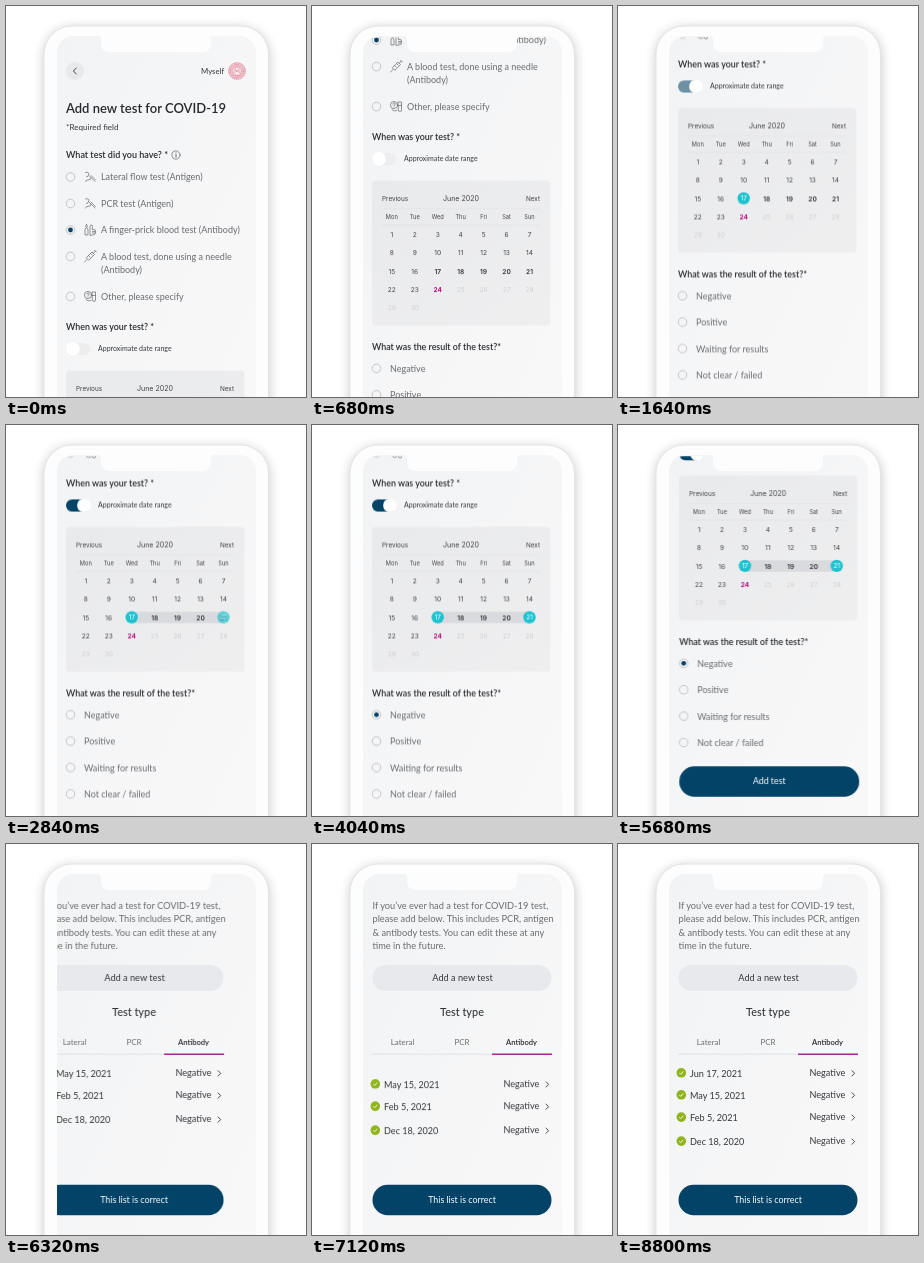
These frames come from a looping animation (300 px wide and 391 px high, 8880 ms). An HTML page:

```html
<!DOCTYPE html>
<html lang="en">
<head>
<meta charset="utf-8">
<title>Add a test</title>
<style>
  html, body { margin: 0; width: 100%; height: 100%; overflow: hidden; background: #fff; }
  svg { display: block; width: 300px; height: 391px; }
  text { font-family: Lato, "Open Sans", sans-serif; fill: #6b6c70; white-space: pre; }
  .dark { fill: #36373c; }
  .bold { font-weight: 600; fill: #28292e; }
  .cal { font-family: Inter, Roboto, sans-serif; fill: #424347; }
  .strong { font-weight: 600; fill: #303135; }
  .faint { fill: #cfd0d3; }
  .today { font-weight: 700; fill: #b5127f; }
  .white { fill: #fff; }
  .line { fill: none; stroke: #5c5d61; stroke-width: .65; stroke-linecap: round; stroke-linejoin: round; }
  .ring { fill: none; stroke: #a6a7ab; stroke-width: .6; }
  .navy { fill: #034368; }

  .scroll, .form, .list, .knob, .track, .from, .band, .to, .pick, .older, .newest, .tick {
    animation: 8880ms linear infinite both;
  }
  .scroll { animation-name: scroll; }
  .form { animation-name: leave; }
  .list { animation-name: enter; }
  .knob { animation-name: knob; }
  .track { animation-name: track; }
  .from { animation-name: from; }
  .band { animation-name: band; transform-origin: 125px 455px; }
  .to { animation-name: to; }
  .pick { animation-name: pick; }
  .older { animation-name: older; }
  .newest { animation-name: newest; }
  .tick { animation-name: tick; }

  @keyframes scroll {
    0% { transform: translateY(0); animation-timing-function: cubic-bezier(.65, 0, .35, 1); }
    13.05% { transform: translateY(-262.6px); }
    46.96% { transform: translateY(-262.6px); animation-timing-function: cubic-bezier(.65, 0, .35, 1); }
    54.15%, 100% { transform: translateY(-314px); }
  }
  @keyframes leave {
    0%, 63.06% { transform: translateX(0); animation-timing-function: cubic-bezier(.65, 0, .35, 1); }
    74.48%, 100% { transform: translateX(215px); }
  }
  @keyframes enter {
    0%, 63.06% { transform: translateX(-215px); animation-timing-function: cubic-bezier(.65, 0, .35, 1); }
    74.48%, 100% { transform: translateX(0); }
  }
  @keyframes knob {
    0%, 14.86% { transform: translateX(0); animation-timing-function: ease-in-out; }
    18.02%, 100% { transform: translateX(11px); }
  }
  @keyframes track {
    0%, 15.77% { fill: #ededee; }
    20.72%, 100% { fill: #034368; }
  }
  @keyframes from {
    0%, 15.77% { opacity: 0; }
    18.02%, 100% { opacity: 1; }
  }
  @keyframes band {
    0%, 21.17% { transform: scaleX(0); animation-timing-function: ease-in-out; }
    30.63%, 100% { transform: scaleX(1); }
  }
  @keyframes to {
    0%, 29.28% { opacity: 0; }
    33.33%, 100% { opacity: 1; }
  }
  @keyframes pick {
    0%, 33.78% { opacity: 0; }
    37.16%, 100% { opacity: 1; }
  }
  @keyframes older {
    0%, 77.7% { transform: translateY(-22px); animation-timing-function: ease-in-out; }
    82.66%, 100% { transform: translateY(0); }
  }
  @keyframes newest {
    0%, 82.66% { opacity: 0; }
    90.09%, 100% { opacity: 1; }
  }
  @keyframes tick {
    0%, 88.96% { opacity: 0; }
    96.85%, 100% { opacity: 1; }
  }
</style>
</head>
<body>
<svg viewBox="0 0 300 391">
  <defs>
    <linearGradient id="glass" x1="0" y1="0" x2="1" y2="1">
      <stop offset="0" stop-color="#f2f3f4"/>
      <stop offset="1" stop-color="#f9f9fa"/>
    </linearGradient>
    <linearGradient id="card" x1="0" y1="0" x2="1" y2="1">
      <stop offset="0" stop-color="#e9eaec"/>
      <stop offset="1" stop-color="#efeff0"/>
    </linearGradient>
    <filter id="soft" x="-20%" y="-10%" width="140%" height="120%">
      <feGaussianBlur stdDeviation="6"/>
    </filter>
    <clipPath id="screen"><rect x="51" y="31.3" width="200" height="420" rx="14"/></clipPath>
    <g id="swab" class="line">
      <path d="M-4.5-4.5Q-1-5.5-1.2-2.8T-3.5 0M-4.5 4.5Q-4 2.5-1.5 2.8T.5 1M-.5-1L5 4.5M1-1.5L5.5 3"/>
    </g>
    <g id="finger" class="line">
      <path d="M-5 4.5V0Q-5-2-3.5-2T-2 0V4.5ZM-3.5-5.5Q-5.5-2.8-3.5-2.8T-3.5-5.5M0 5V-3.5Q0-5 1.2-5T2.4-3.5V-.5H4Q5.5-.5 5.5 1V3Q5 5 3 5ZM2.4 1.5H5M2.4 3H5"/>
    </g>
    <g id="needle" class="line">
      <path d="M-5.5 5.5L-3 3M-3.5 1L2-4.5 4.5-2-1 3.5ZM3.2-3.2L5.5-5.5M4.5-6.2L6.2-4.5M-1.5-1L0 .5M.5-3L2-1.5"/>
    </g>
    <g id="other" class="line">
      <circle cx="-2" cy="-1.5" r="3.6"/>
      <path d="M-3.2-2.3Q-3-3.6-1.9-3.6T-.8-2.4-2-.9M-2 .3V.4M2.4-4.5H5.5V3.5Q5.5 5 4 5T2.4 3.5ZM2.4-1H5.5M-4 3.2Q-2 5.5 1 4"/>
    </g>
  </defs>

  <rect x="38" y="22" width="225" height="420" rx="28" fill="#000" opacity=".22" filter="url(#soft)"/>
  <rect x="38" y="20" width="224.5" height="420" rx="28" fill="#fdfdfd" stroke="#e4e4e5"/>
  <rect x="51" y="30" width="199" height="420" rx="16" fill="url(#glass)"/>

  <g clip-path="url(#screen)">
    <g class="form"><g class="scroll" id="form"></g></g>
    <g class="list" id="list"></g>
  </g>
  <path d="M91 29.5Q95 29.5 95 34V37Q95 46 104 46H196Q205 46 205 37V34Q205 29.5 209 29.5Z" fill="#fdfdfd"/>
</svg>

<script>
  // y is the visual middle of the line
  const text = (x, y, size, str, cls = "", anchor = "start") =>
    `<text x="${x}" y="${(y + size * 0.35).toFixed(2)}" font-size="${size}" class="${cls}" text-anchor="${anchor}">${str}</text>`;
  const mid = (x, y, size, str, cls) => text(x, y, size, str, cls, "middle");
  const pill = (x, y, w, h, attrs) =>
    `<rect x="${x}" y="${y}" width="${w}" height="${h}" rx="${h / 2}" ${attrs}/>`;
  const dot = (x, y, r, attrs) => `<circle cx="${x}" cy="${y}" r="${r}" ${attrs}/>`;
  const radio = y => dot(64.5, y, 4.3, 'class="ring"');
  const chosen = (y, cls) => `<g class="${cls}">${dot(64.5, y, 2.4, 'class="navy"')}</g>`;
  const rule = (y, x1, x2, color, w) =>
    `<path d="M${x1} ${y}H${x2}" stroke="${color}" stroke-width="${w}"/>`;

  function header() {
    const rings = [8.2, 6.6, 5].map(r =>
      dot(231, 65, r, 'fill="none" stroke="#d9788f" stroke-width=".8" stroke-dasharray="1.5 .6"')).join("");
    return dot(69, 65, 9, 'fill="#e8e9eb"') +
      '<path class="line" d="M70.3 62L67.4 65 70.3 68" style="stroke:#333;stroke-width:.9"/>' +
      text(195, 65, 7.8, "Myself", "dark") +
      dot(231, 65, 8.8, 'fill="#f3d3da"') + rings +
      dot(231, 63, 1.8, 'fill="#fbeef1" stroke="#d9788f" stroke-width=".5"') +
      '<path d="M227.5 69Q227.5 65.3 231 65.3T234.5 69Z" fill="#fbeef1" stroke="#d9788f" stroke-width=".5"/>' +
      text(60, 102.7, 13, "Add new test for COVID-19", "bold") +
      text(60, 121, 8.1, "*Required field", "dark");
  }

  function options() {
    const rows = [
      [171, "swab", "Lateral flow test (Antigen)"],
      [197.5, "swab", "PCR test (Antigen)"],
      [224, "finger", "A finger-prick blood test (Antibody)"],
      [250.5, "needle", "A blood test, done using a needle"],
      [290.5, "other", "Other, please specify"]
    ];
    return text(60, 149, 9, "What test did you have? *", "bold") +
      dot(170, 149, 4.1, 'class="line"') +
      '<path class="line" d="M170 148.6V151.2M170 146.8V146.9" style="stroke:#222"/>' +
      rows.map(([y, icon, label]) =>
        radio(y) + `<use href="#${icon}" x="84" y="${y}"/>` + text(95, y, 9, label)).join("") +
      chosen(224, "") + text(95, 264, 9, "(Antibody)");
  }

  function calendar() {
    const col = i => 79.8 + i * 22.95;
    const row = i => 418.7 + i * 18.3;
    const end = (day, cls) => {
      const x = col((day - 1) % 7);
      return `<g class="${cls}">${dot(x, 454.9, 6.2, 'fill="#1fc3d0"')}${mid(x, 454.9, 6.6, day, "cal white")}</g>`;
    };
    let out = '<rect x="60" y="364.5" width="178.5" height="145" rx="4" fill="url(#card)"/>' +
      text(70, 382.6, 6.4, "Previous", "cal") + mid(149, 382.6, 7.1, "June 2020", "cal") +
      text(228, 382.6, 6.4, "Next", "cal", "end") +
      rule(392.5, 70, 228, "#e0e1e3", 0.5) + rule(409, 70, 228, "#dcdddf", 0.5) +
      '<rect class="band" x="125" y="449.3" width="93" height="11.4" fill="#d9dadd"/>';
    ["Mon", "Tue", "Wed", "Thu", "Fri", "Sat", "Sun"].forEach((d, i) => {
      out += mid(col(i), 401.2, 5.7, d, "cal");
    });
    for (let day = 1; day <= 30; day++) {
      const kind = day === 24 ? "today" : day > 24 ? "faint" : day > 16 && day < 22 ? "strong" : "";
      out += mid(col((day - 1) % 7), row(Math.floor((day - 1) / 7)), 6.6, day, "cal " + kind);
    }
    return out + end(17, "from") + end(21, "to");
  }

  function results() {
    const labels = ["Negative", "Positive", "Waiting for results", "Not clear / failed"];
    return text(60, 531, 8.9, "What was the result of the test?*", "bold") +
      labels.map((label, i) => {
        const y = 552.6 + i * 26.4;
        return radio(y - 0.3) + text(78, y, 9, label);
      }).join("") +
      chosen(552.3, "pick") +
      pill(60, 655.3, 180, 30.5, 'class="navy"') + mid(150, 670.3, 8.8, "Add test", "white");
  }

  function form() {
    return header() + options() +
      text(60, 321.3, 8.9, "When was your test? *", "bold") +
      pill(60, 337, 24, 12.2, 'class="track"') +
      `<g class="knob">${dot(67, 343.5, 7.2, 'fill="#000" opacity=".03"')}${dot(67, 343, 6.9, 'fill="#fff"')}</g>` +
      text(92, 342.7, 7, "Approximate date range", "dark") +
      calendar() + results();
  }

  function entry(y, date, tickClass = "") {
    return `<g class="${tickClass}">${dot(63.3, y - 0.5, 4.8, 'fill="#8fb41c"')}` +
      `<path d="M61.3 ${y - 0.4}l1.4 1.4 2.6-2.8" fill="none" stroke="#fff" stroke-width=".9"/></g>` +
      text(72, y + 0.5, 9.1, date, "dark") + text(191.5, y - 0.3, 9.1, "Negative", "dark") +
      `<path class="line" d="M234 ${y - 2.6}l2.6 2.6-2.6 2.6" style="stroke:#333;stroke-width:.9"/>`;
  }

  function list() {
    const intro = [
      "If you’ve ever had a test for COVID-19 test,",
      "please add below. This includes PCR, antigen",
      "&amp; antibody tests. You can edit these at any",
      "time in the future."
    ];
    return intro.map((line, i) => text(60.5, 62 + i * 13.2, 9.25, line)).join("") +
      pill(60.5, 121, 179, 26, 'fill="#e8e9ec"') + mid(150.5, 133.8, 9.2, "Add a new test", "dark") +
      `<g font-weight="500">${mid(150, 168.5, 10.9, "Test type", "dark")}</g>` +
      mid(90.5, 198, 7.9, "Lateral") + mid(150, 198, 7.9, "PCR") + mid(209.5, 198, 7.6, "Antibody", "bold") +
      rule(210.2, 60, 240, "#dcdde0", 0.8) + rule(210.2, 180, 240, "#a32a96", 1.5) +
      `<g class="newest">${entry(229.3, "Jun 17, 2021", "tick")}</g>` +
      `<g class="older">${entry(251.3, "May 15, 2021")}${entry(273.6, "Feb 5, 2021")}${entry(297.6, "Dec 18, 2020")}</g>` +
      pill(60.5, 340.7, 179, 30.5, 'class="navy"') + mid(150, 356, 8.9, "This list is correct", "white");
  }

  document.getElementById("form").innerHTML = form();
  document.getElementById("list").innerHTML = list();
</script>
</body>
</html>
```
